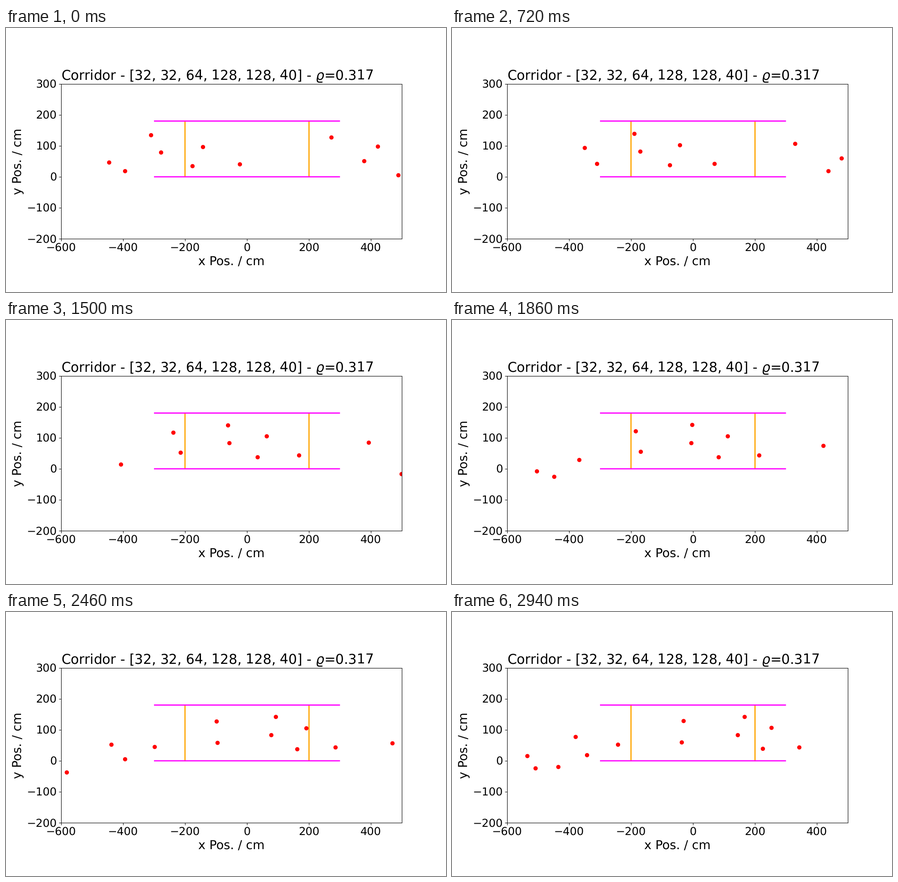
A matplotlib script for the animation above (3 s loop, 966 by 580 pixels).

```python
import numpy as np
import matplotlib.pyplot as plt
from matplotlib.animation import FuncAnimation

W, H, DPI = 966, 580, 96
FRAMES, INTERVAL = 50, 60
PT = 96.6 / DPI          # font scale: a 10 x 6 inch layout

ENTRY_Y = -45            # everyone steps in on this line, cm
EXIT_SPEED = 4.8         # cm per frame behind the corridor
TAU = 15                 # frames needed to settle into a lane
FATIGUE = 0.001          # share of the speed lost over time

plt.rcParams["font.family"] = "DejaVu Sans"
plt.rcParams["text.hinting"] = "none"

# entry frame, entry x, lane y, walking speed
ENTERING = [
    (-48, -760, 143, 11.46), (-48, -675, 84, 10.12), (-48, -553, 39, 9.61),
    (-48, -368, 44, 8.79), (-40, -443, 107, 9.36), (-14, -476, 61, 8.38),
    (-11, -517, 133, 9.77), (13, -472, 62, 8.05), (27, -525, 115, 8.89),
    (27, -467, 39, 7.6), (40, -587, 89, 8.89), (45, -453, 65, 7.64),
    (45, -525, 46, 7.05),
]
# x, y, sideways drift
LEAVING = [(272, 127, -1.7), (378, 51, -2.7), (421, 98, -3.2), (488, 6, -2.9)]


def enter(frame, start, x, lane, speed):
    """Start at about half speed, then ease into the lane."""
    age = frame - start
    if age < 0:
        return np.nan, np.nan
    settled = 1 - np.exp(-age / TAU)
    way = age - 0.45 * TAU * settled - FATIGUE * age ** 2
    return x + speed * way, ENTRY_Y + (lane - ENTRY_Y) * settled


def leave(frame, x, y, drift):
    return x + EXIT_SPEED * frame, y + drift * frame


def positions(frame):
    return np.array([enter(frame, *w) for w in ENTERING]
                    + [leave(frame, *w) for w in LEAVING])


fig, ax = plt.subplots(figsize=(W / DPI, H / DPI), dpi=DPI)
ax.set_aspect("equal")
ax.set_xlim(-600, 500)
ax.set_ylim(-200, 300)
ax.set_xticks(range(-600, 500, 200))
ax.set_yticks(range(-200, 301, 100))
ax.tick_params(labelsize=18 * PT)
ax.set_xlabel("x Pos. / cm", fontsize=20 * PT)
ax.set_ylabel("y Pos. / cm", fontsize=20 * PT)
ax.set_title(r"Corridor - [32, 32, 64, 128, 128, 40] - $\varrho$=0.317",
             fontsize=22 * PT, loc="left")

line = dict(lw=2 * PT, solid_capstyle="butt", snap=False)
for x in (-200, 200):
    ax.plot([x, x], [0, 180], color="orange", **line)
for y in (0, 180):
    ax.plot([-300, 300], [y, y], color="magenta", **line)
dots, = ax.plot([], [], "ro", ms=6, snap=False)


def update(frame):
    dots.set_data(*positions(frame).T)
    return dots,


anim = FuncAnimation(fig, update, frames=FRAMES, interval=INTERVAL,
                     repeat=True, repeat_delay=0)
plt.show()
```
